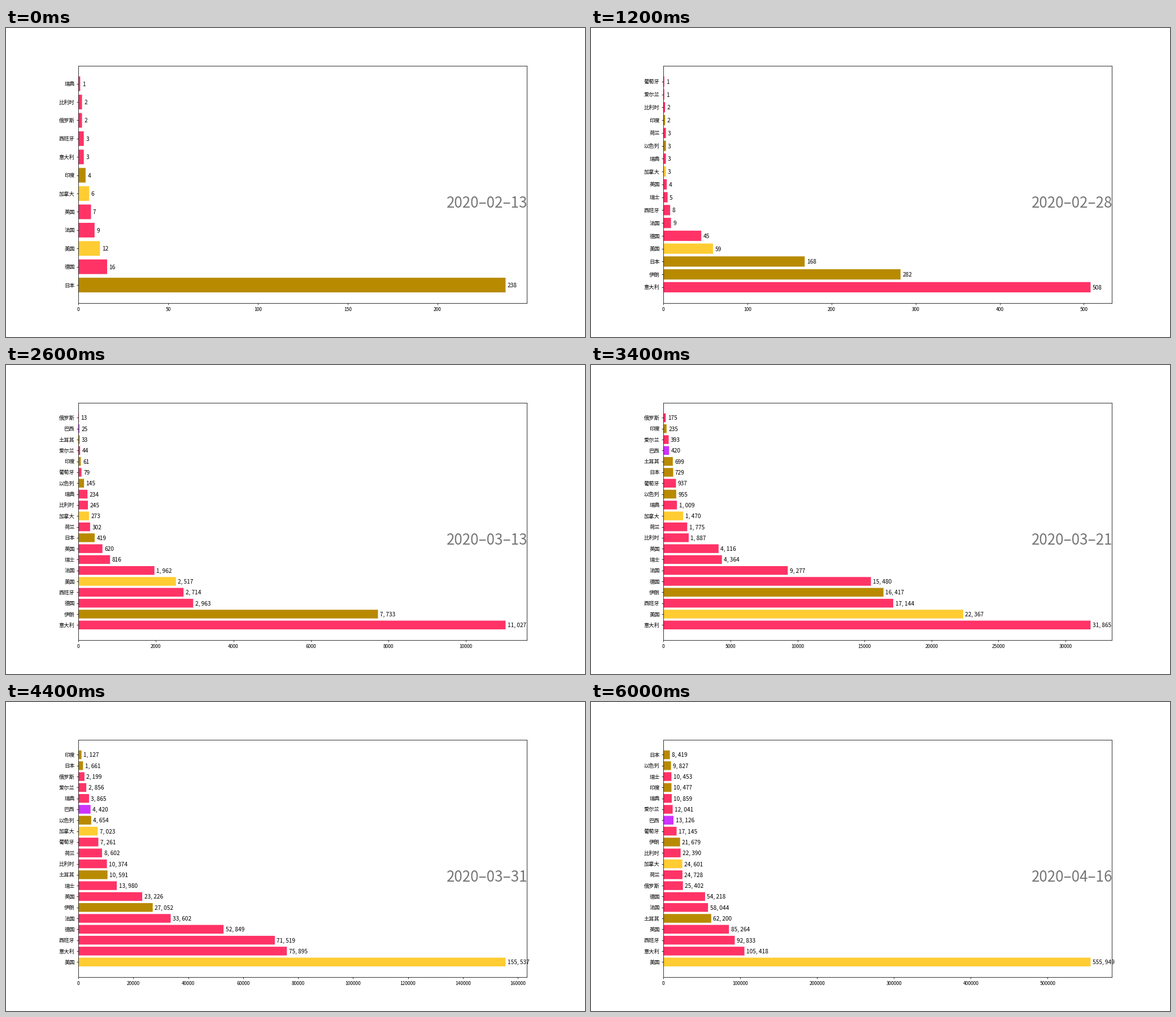
A matplotlib script for the animation above (6100 ms loop, 1025x547 px).

```python
import matplotlib.pyplot as plt
import numpy as np
from matplotlib.animation import FuncAnimation
from matplotlib.transforms import ScaledTranslation

WIDTH, HEIGHT, DPI = 1025, 547, 64
FRAMES, INTERVAL = 61, 100
LEFT, RIGHT, BOTTOM, TOP = 128.2, 922.2, 59.9, 480.4

EUROPE, ASIA = "#FF3366", "#B88A00"
NORTH_AMERICA, SOUTH_AMERICA = "#FFCC33", "#CC33FF"

EARLY_DAYS, GROWTH_DAYS = [0, 7, 17], [17, 44, 60]
UNSEEN = 0.4  # rounds to zero, so the bar stays hidden

# Counts on the growth days, listed by rank on the first day.
GROWTH = {
    "日本": (ASIA, 252, 1661, 8419),
    "德国": (EUROPE, 226, 52849, 54218),
    "美国": (NORTH_AMERICA, 110, 155537, 555949),
    "法国": (EUROPE, 196, 33602, 58044),
    "英国": (EUROPE, 43, 23226, 85264),
    "加拿大": (NORTH_AMERICA, 26, 7023, 24601),
    "印度": (ASIA, 12, 1127, 10477),
    "意大利": (EUROPE, 2263, 75895, 105418),
    "西班牙": (EUROPE, 162, 71519, 92833),
    "俄罗斯": (EUROPE, UNSEEN, 2199, 25402),
    "比利时": (EUROPE, 12, 10374, 22390),
    "瑞典": (EUROPE, 30, 3865, 10859),
    "伊朗": (ASIA, 2278, 27052, 21679),
    "以色列": (ASIA, 9, 4654, 9827),
    "瑞士": (EUROPE, 56, 13980, 10453),
    "荷兰": (EUROPE, 24, 8602, 24728),
    "爱尔兰": (EUROPE, 2, 2856, 12041),
    "葡萄牙": (EUROPE, 2, 7261, 17145),
    "巴西": (SOUTH_AMERICA, UNSEEN, 4420, 13126),
    "土耳其": (ASIA, UNSEEN, 10591, 62200),
}
# The few places that still report in the quiet week.
QUIET = {"意大利": 114, "日本": 112, "伊朗": 35, "美国": 32, "德国": 9, "以色列": 1}


def px(n):
    """Pixels to points."""
    return n * 72 / DPI


def first_count(rank):
    """One clear leader, then a short geometric tail of twelve in all."""
    if rank == 0:
        return 238
    return 16 * 0.77 ** (rank - 1) if rank < 12 else UNSEEN


def count_on(frame, rank, name, growth):
    """Straight lines in log scale at first, then a parabola that flattens."""
    if frame < GROWTH_DAYS[0]:
        early = [first_count(rank), QUIET.get(name, UNSEEN), growth[0]]
        log_count = np.interp(frame, EARLY_DAYS, np.log(early))
    else:
        log_count = np.polyval(np.polyfit(GROWTH_DAYS, np.log(growth), 2), frame)
    return round(np.exp(log_count))


def ranking(frame):
    """Visible (count, name, colour) rows, largest first."""
    rows = [(count_on(frame, rank, name, growth), name, colour)
            for rank, (name, (colour, *growth)) in enumerate(GROWTH.items())]
    return sorted((row for row in rows if row[0]), key=lambda row: -row[0])


def date_label(frame):
    # Reports pause for three days after the first one.
    day = np.datetime64("2020-02-16") + (frame if frame else -3)
    return str(day).replace("-", "–")


plt.rcParams.update({
    "font.family": "Noto Sans CJK JP",
    "axes.linewidth": px(0.8),
    "xtick.major.width": px(0.8), "ytick.major.width": px(0.8),
    "xtick.major.size": px(3.24), "ytick.major.size": px(3.24),
    "xtick.major.pad": px(3.24), "ytick.major.pad": px(3.24),
    "xtick.labelsize": px(8.35), "ytick.labelsize": px(9.26),
})

fig = plt.figure(figsize=(WIDTH / DPI, HEIGHT / DPI), dpi=DPI)
ax = fig.add_axes([LEFT / WIDTH, BOTTOM / HEIGHT,
                   (RIGHT - LEFT) / WIDTH, (TOP - BOTTOM) / HEIGHT])
label_offset = ScaledTranslation(3.5 / DPI, 0, fig.dpi_scale_trans)


def draw(frame):
    ax.clear()
    counts, names, colours = zip(*ranking(frame))
    ax.barh(names, counts, color=colours, snap=False)
    ax.set_xlim(0, counts[0] * 1.05)
    for y, count in enumerate(counts):
        ax.text(count, y, f"{count:,}".replace(",", ", "), fontsize=px(10.1),
                va="center_baseline", transform=ax.transData + label_offset)
    ax.text(780 / WIDTH, 1 - 318.3 / HEIGHT, date_label(frame),
            transform=fig.transFigure, fontsize=px(26.1), color="#777777")


anim = FuncAnimation(fig, draw, frames=FRAMES, interval=INTERVAL, repeat=True)
plt.show()
```
